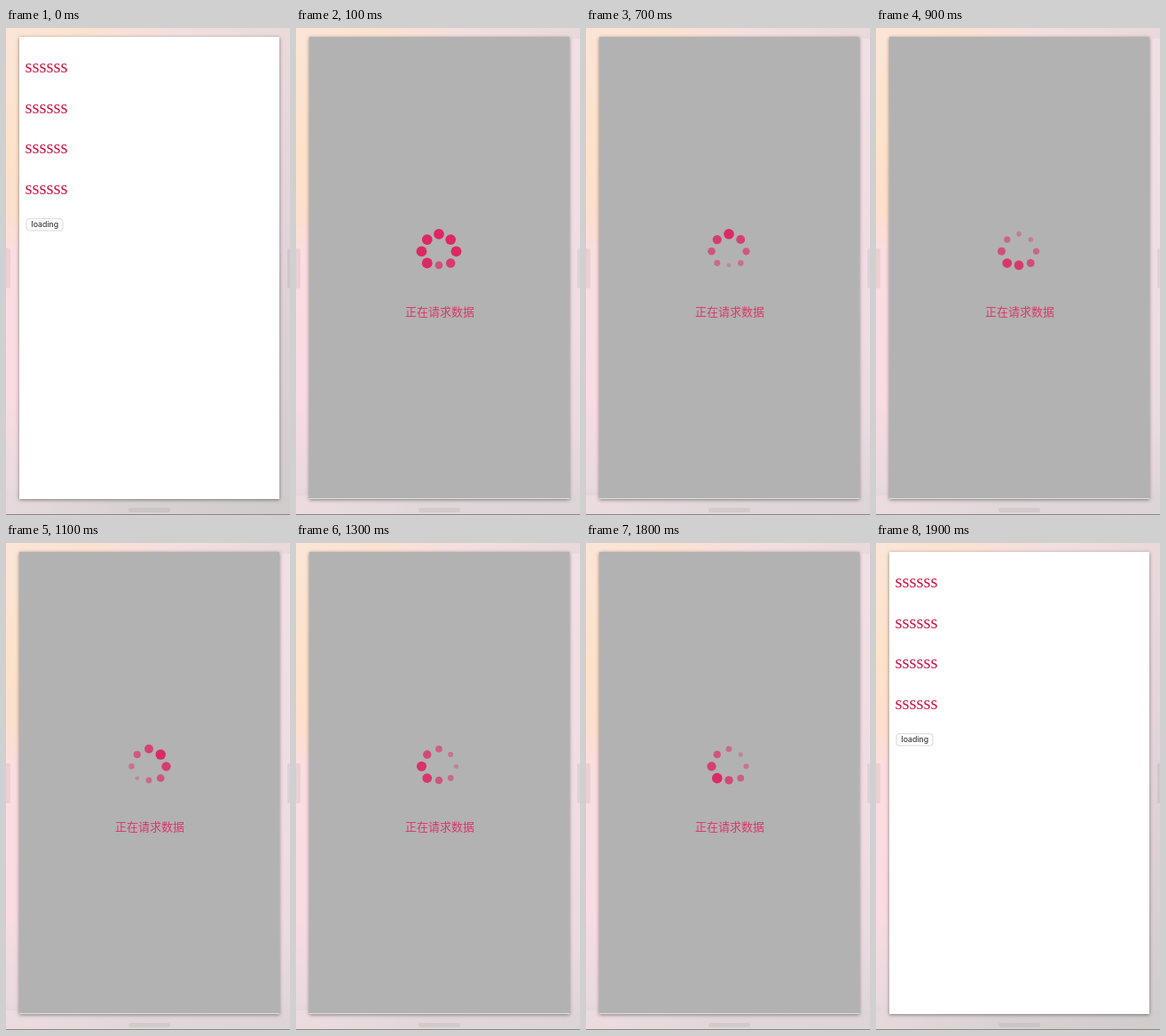
Recreate the animation shown at these times as an HTML page. Size 320 by 548 pixels, loop 2 s.

```html
<!DOCTYPE html>
<html lang="zh">
<head>
<meta charset="utf-8">
<style>
  html, body { margin: 0; width: 100%; height: 100%; overflow: hidden; }
  body { background: #ded5d7; }
  #stage { position: relative; width: 320px; height: 548px; overflow: hidden; }
  #stage div { position: absolute; box-sizing: border-box; }
  .left, .right, .top, .bottom { transition: none; }
  .left { left: 0; top: 0; width: 20px; height: 548px;
    background: linear-gradient(#fbe5d6, #fde2cb 25%, #fcdfcd 38%, #fadde0 46%, #f9dce2 75%, #e9dadd 94%, #d8d1d2); }
  .right { left: 300px; top: 0; width: 20px; height: 548px;
    background: linear-gradient(#eadada, #e9d6dc 20%, #e0d2d9 50%, #d9cfd4 75%, #d1cccd); }
  .top { left: 0; top: 0; width: 320px; height: 12px;
    background: linear-gradient(90deg, #fbe5d6, #fae2d2 30%, #f3dedf 60%, #e9d9da); }
  .bottom { left: 0; top: 526px; width: 320px; height: 22px;
    background: linear-gradient(90deg, #e6d9dc, #d9d2d3 40%, #d0cccc); }
  .busy .right { background: linear-gradient(#f0dfe3, #f0dde4 50%, #eadbe1 80%, #ddd4d7); }
  .busy .bottom { background: linear-gradient(90deg, #ecdce0, #e0d7d9 45%, #dcd4d7); }
  .handle { background: #0000000f; border-radius: 2px; }
  .edge { left: 0; top: 546.5px; width: 320px; height: 2px; background: #8b8688; }
  .card { left: 15px; top: 10px; width: 292.5px; height: 519.5px; background: #fff;
    box-shadow: 0 1px 4px #00000070; }
  .busy .card { background: #b2b2b2; border-bottom: 1px solid #dedede; }
  svg { position: absolute; left: 0; top: 0; }
  .line { font: 20.6px "Liberation Serif", serif; fill: #cd1747; }
  .label { font: 8.8px Inter, sans-serif; fill: #222; }
  .note { font: 300 13px "Noto Sans CJK SC", "Noto Sans CJK", sans-serif; fill: #d8396a; }
  .busy #idle, #stage:not(.busy) #loader { display: none; }
</style>
</head>
<body>
<div id="stage">
  <div class="left"></div>
  <div class="right"></div>
  <div class="top"></div>
  <div class="bottom"></div>
  <div class="handle" style="left:-2px;top:248px;width:7px;height:45px"></div>
  <div class="handle" style="left:317px;top:248px;width:7px;height:45px"></div>
  <div class="handle" style="left:138px;top:540px;width:47px;height:5px"></div>
  <div class="edge"></div>
  <div class="card"></div>
  <svg width="320" height="548">
    <g id="idle">
      <rect x="23" y="214.7" width="41" height="13.3" rx="3" fill="#fff" stroke="#d3cccd" stroke-width=".8"/>
      <text class="label" x="28.6" y="224.4">loading</text>
    </g>
    <g id="loader">
      <text class="note" x="162" y="324" text-anchor="middle">正在请求数据</text>
    </g>
  </svg>
</div>
<script>
  const stage = document.getElementById('stage');
  const idle = document.getElementById('idle');
  const loader = document.getElementById('loader');

  function add(parent, tag, attrs) {
    const node = document.createElementNS('http://www.w3.org/2000/svg', tag);
    for (const key in attrs) node.setAttribute(key, attrs[key]);
    return parent.appendChild(node);
  }

  for (let i = 0; i < 4; i++) {
    add(idle, 'text', { class: 'line', x: 21.4, y: 50 + i * 45.5 }).textContent = 'ssssss';
  }

  // Counterclockwise from the bottom; the bottom dot sits closer to the centre.
  const dots = Array.from({ length: 8 }, (_, i) => {
    const angle = i * Math.PI / 4;
    const radius = i % 2 ? 18.7 : 19.5;
    return add(loader, 'circle', {
      cx: 161 + radius * Math.sin(angle),
      cy: 251.3 + (i ? radius * Math.cos(angle) : 15.6),
      fill: '#dc2863'
    });
  });

  const LOOP = 2000, STEP = 100, SPEED = 2.13, STAGGER = 0.12;

  function draw(now) {
    const step = Math.floor(now % LOOP / STEP);
    const last = LOOP / STEP - 1;
    stage.classList.toggle('busy', step > 0 && step < last);

    const time = step * STEP / 1000 * SPEED;
    dots.forEach((dot, i) => {
      const phase = Math.max(0, time - i * STAGGER) % 1;
      const fade = 1 - Math.abs(2 * phase - 1);
      dot.setAttribute('r', 5.9 * (1 - 0.6 * fade));
      dot.setAttribute('opacity', 1 - 0.7 * fade);
    });
  }

  let start;
  function tick(now) {
    start ??= now;
    draw(now - start);
    requestAnimationFrame(tick);
  }
  draw(0);
  requestAnimationFrame(tick);
</script>
</body>
</html>
```
